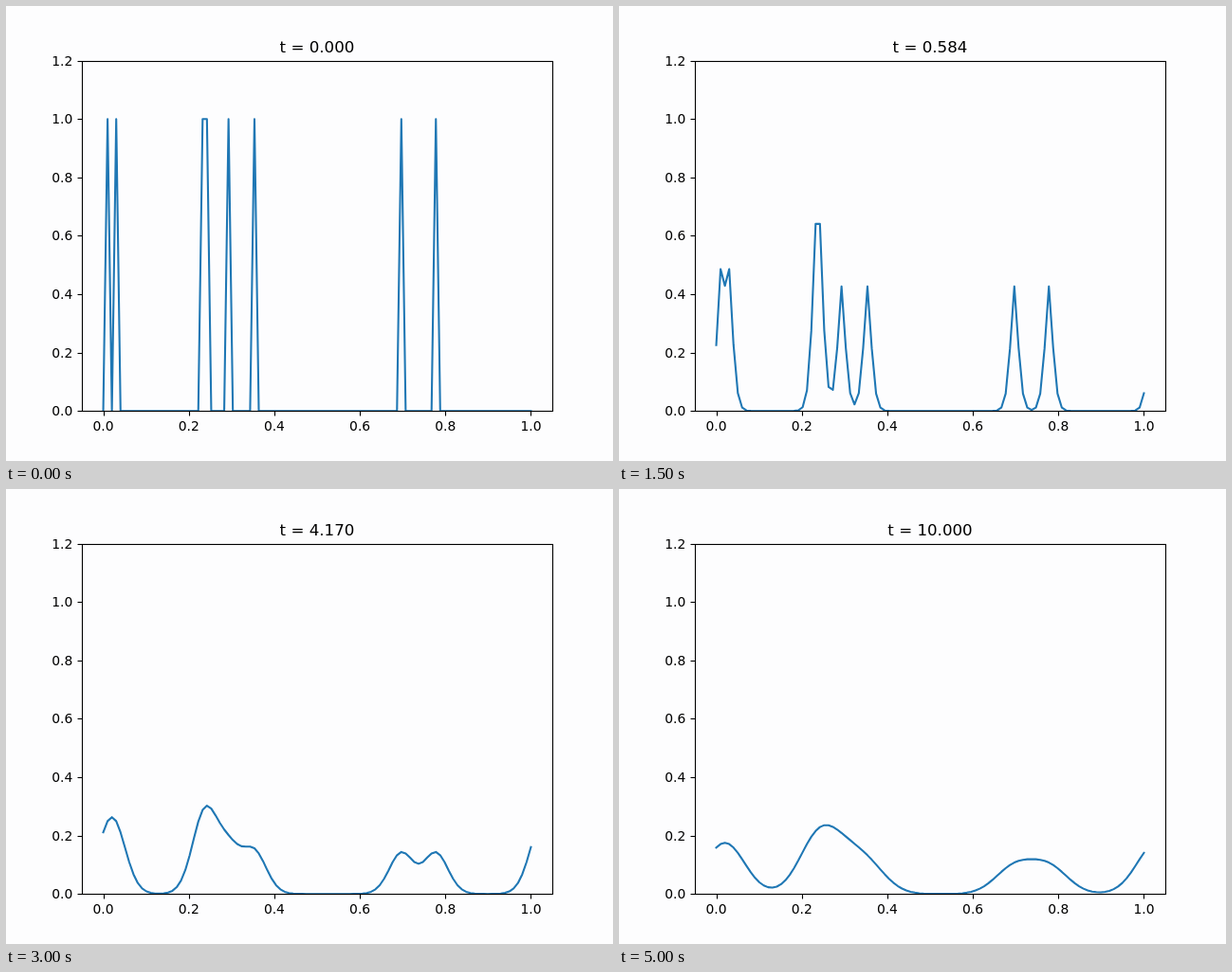
An HTML page with a canvas for the animation above (5.25 s loop, 640 px wide and 480 px high).

```html
<!DOCTYPE html>
<html lang="en">
<head>
<meta charset="utf-8">
<title>Diffusion on a ring</title>
<style>
  html, body { margin: 0; width: 100%; height: 100%; overflow: hidden; background: #fdfdfe; }
  canvas { display: block; }
</style>
</head>
<body>
<canvas id="plot" width="640" height="480"></canvas>
<script>
const ctx = document.getElementById('plot').getContext('2d');
const N = 100, END = 10, STEP_MS = 250, SHOWN = 21;
const RTOL = 1e-3, ATOL = 1e-6;
const SPIKES = [1, 3, 23, 24, 29, 35, 69, 77];

// Dormand-Prince coefficients
const A = [
  [],
  [1 / 5],
  [3 / 40, 9 / 40],
  [44 / 45, -56 / 15, 32 / 9],
  [19372 / 6561, -25360 / 2187, 64448 / 6561, -212 / 729],
  [9017 / 3168, -355 / 33, 46732 / 5247, 49 / 176, -5103 / 18656],
  [35 / 384, 0, 500 / 1113, 125 / 192, -2187 / 6784, 11 / 84]
];
const E = [-71 / 57600, 0, 71 / 16695, -71 / 1920, 17253 / 339200, -22 / 525, 1 / 40];

const slope = u => u.map((v, i) => u[(i + 1) % N] - 2 * v + u[(i + N - 1) % N]);
const norm = (v, scale) => Math.sqrt(v.reduce((s, x, i) => s + (x / scale[i]) ** 2, 0) / N);
const mix = (ks, c, i) => c.reduce((s, w, j) => s + w * ks[j][i], 0);

function firstStep(u, f) {
  const scale = u.map(v => ATOL + Math.abs(v) * RTOL);
  const d1 = norm(f, scale);
  const h0 = 0.01 * norm(u, scale) / d1;
  const g = slope(u.map((v, i) => v + h0 * f[i]));
  const d2 = norm(g.map((v, i) => v - f[i]), scale) / h0;
  return Math.min(100 * h0, (0.01 / Math.max(d1, d2)) ** 0.2);
}

// Adaptive integration; every accepted step becomes one picture
function solve() {
  let t = 0, u = Array.from({ length: N }, (_, i) => SPIKES.includes(i) ? 1 : 0);
  let f = slope(u), h = firstStep(u, f), rejected = false;
  const out = [{ t, u }];
  while (t < END && out.length < 200) {
    const next = Math.min(t + h, END);
    h = next - t;
    const ks = [f];
    let trial = u;
    for (let s = 1; s < A.length; s++) {
      trial = u.map((v, i) => v + h * mix(ks, A[s], i));
      ks.push(slope(trial));
    }
    const scale = u.map((v, i) => ATOL + RTOL * Math.max(Math.abs(v), Math.abs(trial[i])));
    const err = norm(u.map((_, i) => h * mix(ks, E, i)), scale);
    const factor = 0.9 * err ** -0.2;
    if (err < 1) {
      t = next;
      u = trial;
      f = ks[6];
      out.push({ t, u });
      h *= Math.min(rejected ? 1 : 10, factor);
      rejected = false;
    } else {
      h *= Math.max(0.2, factor);
      rejected = true;
    }
  }
  return out;
}

const states = solve();
const px = x => 102.545 + 450.91 * x;
const py = y => 427.2 - 308 * y;

function line(x1, y1, x2, y2) {
  ctx.beginPath();
  ctx.moveTo(x1, y1);
  ctx.lineTo(x2, y2);
  ctx.stroke();
}

function curve(u) {
  ctx.save();
  ctx.beginPath();
  ctx.rect(80, 58, 496, 369);
  ctx.clip();
  ctx.beginPath();
  u.forEach((v, i) => ctx.lineTo(px(i / (N - 1)), py(v)));
  ctx.strokeStyle = '#1f77b4';
  ctx.lineWidth = 2.083;
  ctx.lineJoin = 'round';
  ctx.lineCap = 'square';
  ctx.stroke();
  ctx.restore();
}

function axes() {
  ctx.strokeStyle = ctx.fillStyle = '#000';
  ctx.lineWidth = 1.11;
  ctx.strokeRect(80.5, 58.5, 496, 369);
  ctx.font = '13.889px "DejaVu Sans", sans-serif';
  for (let i = 0; i <= 6; i++) {
    const v = i / 5, label = v.toFixed(1);
    const y = Math.round(py(v)) + 0.5;
    line(75.5, y, 80.5, y);
    ctx.textAlign = 'right';
    ctx.fillText(label, 70.3, Math.round(py(v) + 5));
    if (i > 5) continue;
    const x = Math.round(px(v)) + 0.5;
    line(x, 427.5, x, 432.5);
    ctx.textAlign = 'center';
    ctx.fillText(label, px(v), 448);
  }
}

function draw() {
  const index = Math.floor(performance.now() / STEP_MS) % SHOWN;
  const { t, u } = states[Math.min(index, states.length - 1)];
  ctx.fillStyle = '#fdfdfe';
  ctx.fillRect(0, 0, 640, 480);
  curve(u);
  axes();
  ctx.font = '16.667px "DejaVu Sans", sans-serif';
  ctx.textAlign = 'center';
  ctx.fillText('t = ' + t.toFixed(3), 328, 49);
  requestAnimationFrame(draw);
}
draw();
</script>
</body>
</html>
```
